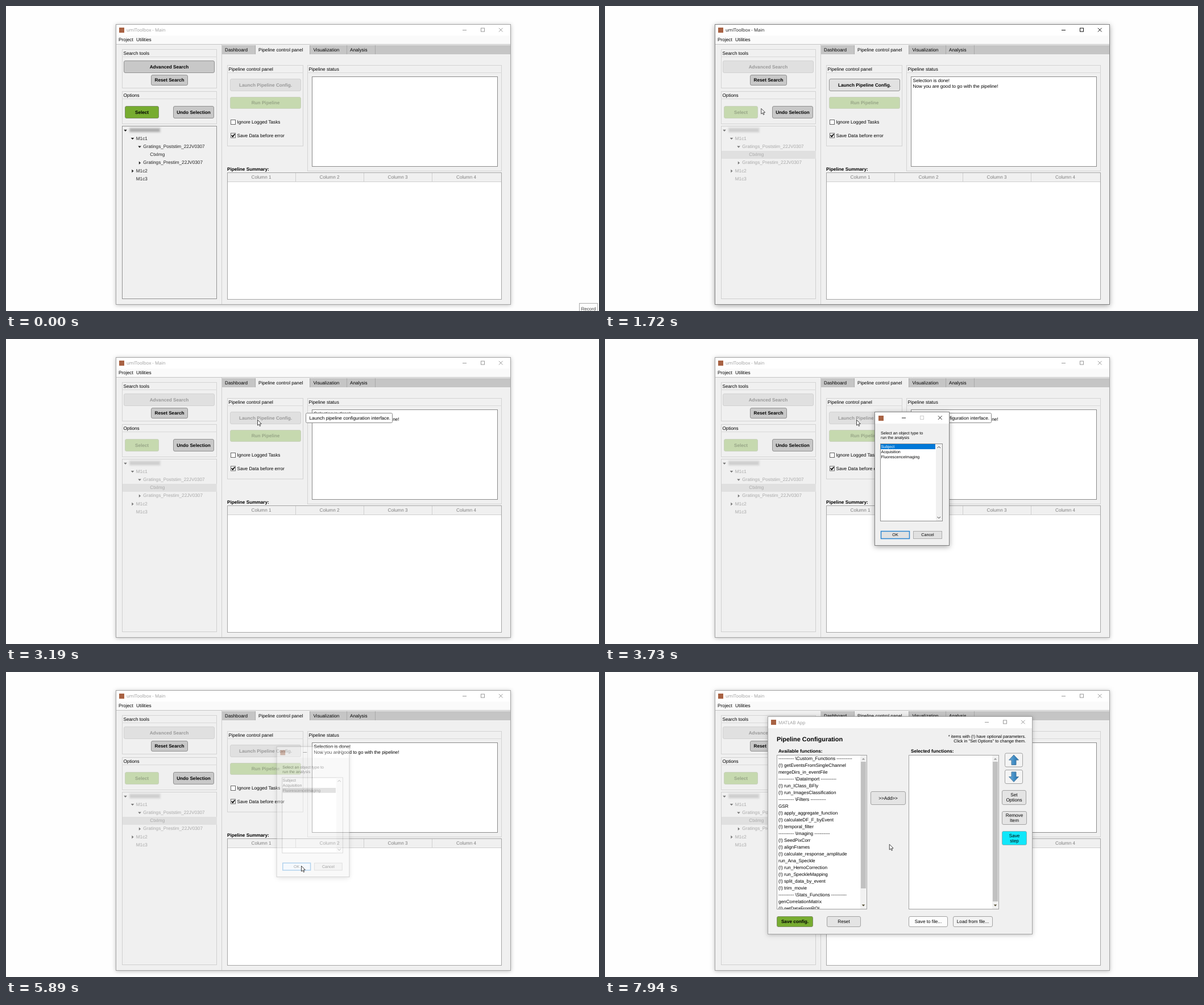
Write an HTML page with a canvas that moves like this. It is 1043 px wide and 537 px high and loops after 8000 ms.

```html
<!DOCTYPE html>
<html lang="en">
<head>
<meta charset="utf-8">
<title>umIToolbox pipeline</title>
<style>
html, body { margin: 0; width: 100%; height: 100%; overflow: hidden; background: #fefefe; }
canvas { display: block; }
</style>
</head>
<body>
<canvas id="stage" width="1043" height="537"></canvas>
<script>
const W = 1043, H = 537, LOOP = 8000, STEP = LOOP / 116;
const ARIAL = '"Liberation Sans", Arial, sans-serif';
const UI = '"Open Sans", "Noto Sans", sans-serif';
const GREEN = '#77ac30', PALE_GREEN = '#c6d9af', GREEN_EDGE = '#7f8f68', FACE = '#f0f0f0';

const screenCtx = document.getElementById('stage').getContext('2d');
const layer = document.createElement('canvas');
layer.width = W;
layer.height = H;
const layerCtx = layer.getContext('2d');
let c = screenCtx;

// Moments (ms) at which the interface changes
const T = {
  record: 70, focus: 760, select: 1480, press: 2760, launch: 3190, dialog: 3330,
  tipEnd: 4010, pick: 4500, ok: 5690, close: 5760, gone: 6000,
  config: 6850, body: 7330, content: 7660
};

// Pointer path: time, x, y
const PATH = [
  [70, 1010, 531], [340, 430, 300], [480, 264, 218], [620, 262, 258],
  [850, 262, 258], [1030, 244.5, 220], [1240, 240, 187], [1620, 240, 187],
  [2200, 431, 148], [2340, 433, 148.5], [2830, 442, 142], [3730, 442, 142],
  [3940, 494, 334], [4430, 508, 205], [4780, 510, 213], [5110, 493, 384],
  [5340, 522, 386], [5620, 519, 341], [6230, 519, 341], [6510, 510, 337],
  [7590, 510, 337], [7940, 499.5, 302]
];

function pointer(t) {
  let i = PATH.findIndex(p => p[0] > t);
  if (i < 0) i = PATH.length - 1;
  if (i === 0) return PATH[0].slice(1);
  const [t0, x0, y0] = PATH[i - 1], [t1, x1, y1] = PATH[i];
  const p = Math.min(1, (t - t0) / (t1 - t0));
  return [x0 + (x1 - x0) * p, y0 + (y1 - y0) * p];
}

function fill(x, y, w, h, color) {
  c.fillStyle = color;
  c.fillRect(x, y, w, h);
}

function box(x, y, x2, y2, border, color, lw = 1) {
  if (color) fill(x, y, x2 - x, y2 - y, color);
  c.strokeStyle = border;
  c.lineWidth = lw;
  c.strokeRect(x + 0.5, y + 0.5, x2 - x - 1, y2 - y - 1);
}

function line(color, ...pts) {
  c.strokeStyle = color;
  c.lineWidth = 1;
  c.beginPath();
  for (let i = 0; i < pts.length; i += 2) c.lineTo(pts[i], pts[i + 1]);
  c.stroke();
}

function poly(color, ...pts) {
  c.fillStyle = color;
  c.beginPath();
  for (let i = 0; i < pts.length; i += 2) c.lineTo(pts[i], pts[i + 1]);
  c.closePath();
  c.fill();
}

// y is the vertical middle of the line
function text(s, x, y, { size = 8.2, bold = false, color = '#000', align = 'left', font = ARIAL } = {}) {
  c.font = `${bold ? 'bold ' : ''}${size}px ${font}`;
  c.textRendering = 'geometricPrecision';
  c.textAlign = align;
  c.fillStyle = color;
  c.fillText(s, x, y + size * 0.33);
}

function button(label, x, y, x2, y2, { face = '#e4e4e4', border = '#a2a2a2', color = '#000', bold = false } = {}) {
  c.beginPath();
  c.roundRect(x + 0.5, y + 0.5, x2 - x - 1, y2 - y - 1, 2.5);
  c.fillStyle = face;
  c.fill();
  c.strokeStyle = border;
  c.lineWidth = 1;
  c.stroke();
  const rows = label.split('\n');
  rows.forEach((s, i) => text(s, (x + x2) / 2, (y + y2) / 2 + (i - (rows.length - 1) / 2) * 9,
    { bold, color, align: 'center' }));
}

function mainButton(label, x, y, x2, y2, on, face = '#c8c8c8', off = '#e0e0e0') {
  const green = face === GREEN;
  button(label, x, y, x2, y2, {
    bold: true, face: on ? face : off,
    border: on ? (green ? GREEN_EDGE : '#929292') : (green ? '#c9d2bd' : '#d2d2d2'),
    color: on ? '#000' : (green ? '#97a587' : '#999')
  });
}

function group(title, x, y, x2, y2) {
  box(x, y, x2, y2, '#d3d3d3');
  line('#d9d9d9', x, y + 13.5, x2, y + 13.5);
  text(title, x + 2.5, y + 6.9);
}

function frame(x, y, x2, y2, barH, strong) {
  c.save();
  c.shadowColor = strong ? 'rgba(0,0,0,.35)' : 'rgba(0,0,0,.26)';
  c.shadowBlur = strong ? 9 : 7;
  c.shadowOffsetY = strong ? 2 : 1;
  fill(x, y, x2 - x, y2 - y, FACE);
  c.restore();
  fill(x, y, x2 - x, barH, '#fff');
  box(x, y, x2, y2, strong ? '#808080' : '#a4a4a4');
}

function windowButtons(right, y, color, maxColor = color) {
  line(color, right - 84, y + 0.5, right - 77, y + 0.5);
  c.strokeStyle = maxColor;
  c.strokeRect(right - 51.5, y - 3, 6, 6);
  line(color, right - 20, y - 3.2, right - 13.4, y + 3.4);
  line(color, right - 13.4, y - 3.2, right - 20, y + 3.4);
}

const icon = (x, y) => fill(x, y, 9, 9, '#a86243');

function treeArrow(x, y, open, color) {
  if (open) poly(color, x - 2.8, y - 1.2, x + 2.8, y - 1.2, x, y + 2);
  else poly(color, x - 1.2, y - 2.8, x - 1.2, y + 2.8, x + 2, y);
}

const TREE = [
  ['', 210, 'open'], ['M1c1', 222.5, 'open'], ['Gratings_Poststim_22JV0307', 235, 'open'],
  ['CtxImg', 247, ''], ['Gratings_Prestim_22JV0307', 235, 'shut'], ['M1c2', 222.5, 'shut'], ['M1c3', 222.5, '']
];
const rowY = i => 218.5 + i * 14.32;

function tree(t, on) {
  box(204, 211, 371, 516, on ? '#929292' : '#d0d0d0', FACE);
  const [px, py] = pointer(t - 100);
  const hover = Math.floor((py - 211) / 14.32);
  if (on && t > T.record && px > 204 && px < 371 && hover >= 0 && hover < TREE.length)
    fill(205, rowY(hover) - 7, 165, 14.3, '#dadada');
  if (t >= T.focus) {
    if (on) box(204, 255, 371, 269, '#56a0d3', '#b4daf3');
    else fill(205, 255, 166, 14, '#e0e0e0');
  }
  TREE.forEach(([name, x, state], i) => {
    const y = rowY(i);
    if (state) treeArrow(x, y + 0.5, state === 'open', on ? '#222' : '#777');
    text(name, x + 6.3, y, { color: on ? '#222' : '#a8a8a8' });
  });
  c.save();
  c.filter = 'blur(1.5px)';
  fill(217, 214, 55, 9, on ? '#d4d4d4' : '#dedede');
  fill(218, 216, 52, 5, on ? '#aaa' : '#cdcdcd');
  c.restore();
}

function checkBox(label, y, checked) {
  box(395, y - 4.5, 404, y + 4.5, '#666', '#fff');
  if (checked) {
    c.lineWidth = 1.7;
    c.strokeStyle = '#000';
    c.beginPath();
    c.moveTo(396.8, y - 0.5);
    c.lineTo(398.8, y + 2);
    c.lineTo(402.3, y - 2.6);
    c.stroke();
  }
  text(label, 406.5, y);
}

function mainWindow(t) {
  const active = t >= T.focus && t < T.launch;
  const free = t < T.select;
  const ready = !free && t < T.launch;
  frame(193, 32, 888, 526, 20, active);
  icon(199, 38);
  text('umIToolbox - Main', 212, 42.7, { size: 7.9, font: UI, color: active ? '#111' : '#999' });
  windowButtons(887, 42, active ? '#111' : '#999');
  fill(194, 52, 693, 15, '#fafafa');
  line('#c4c4c4', 194, 67.5, 887, 67.5);
  text('Project', 198, 59.5, { size: 8.3 });
  text('Utilities', 229, 59.5, { size: 8.3 });

  group('Search tools', 204, 76, 371, 145);
  mainButton('Advanced Search', 207, 96, 367, 118, free);
  mainButton('Reset Search', 255, 121, 320, 140, true);
  group('Options', 204, 150, 371, 208);
  mainButton('Select', 209, 176, 269, 198, free, GREEN, PALE_GREEN);
  mainButton('Undo Selection', 294, 176, 366, 198, true);
  tree(t, free);

  line('#cfcfcf', 379.5, 68, 379.5, 525);
  fill(380, 69, 507, 16, '#c5c5c5');
  fill(438, 69, 96, 16, FACE);
  for (const x of [438.5, 534.5, 599.5, 649.5]) line('#aaa', x, 69, x, 85);
  text('Dashboard', 385, 77);
  text('Pipeline control panel', 444, 77);
  text('Visualization', 540.5, 77);
  text('Analysis', 605, 77);

  group('Pipeline control panel', 389, 104, 523, 247);
  const pressed = t >= T.press && ready;
  mainButton('Launch Pipeline Config.', 394, 128, 519, 150, ready, pressed ? '#d0d0d0' : '#e2e2e2');
  mainButton('Run Pipeline', 394, 160, 519, 181, false, GREEN, PALE_GREEN);
  checkBox('Ignore Logged Tasks', 204.5, false);
  checkBox('Save Data before error', 228, true);

  group('Pipeline status', 530, 104, 872, 291);
  box(538, 124, 865, 283, '#8a8a8a', '#fff');
  if (!free) {
    text('Selection is done!', 541.5, 131.5);
    text('Now you are good to go with the pipeline!', 541.5, 141);
  }

  text('Pipeline Summary:', 389, 287, { bold: true });
  box(389, 293, 872, 517, '#a5a5a5', '#fff');
  fill(390, 294, 481, 16, FACE);
  line('#cfcfcf', 390, 309.5, 871, 309.5);
  [449, 569, 689, 809.5].forEach((x, i) => {
    text('Column ' + (i + 1), x, 301.7, { color: '#7d7d7d', align: 'center' });
    if (i) line('#cfcfcf', 389.5 + i * 120, 294, 389.5 + i * 120, 310);
  });
}

function tooltip() {
  c.beginPath();
  c.roundRect(527.5, 130.5, 152, 17, 2);
  c.fillStyle = '#fff';
  c.fill();
  c.lineWidth = 1;
  c.strokeStyle = '#888';
  c.stroke();
  text('Launch pipeline configuration interface.', 676, 139, { align: 'right' });
}

function dialog(t) {
  frame(474, 128, 606, 364, 21, true);
  icon(481, 135);
  windowButtons(606, 138.5, '#222', '#ccc');
  const small = { size: 7.15 };
  text('Select an object type to', 485, 165.5, small);
  text('run the analysis', 485, 174, small);
  box(484, 184, 594, 321, '#8f8f8f', '#fff');
  fill(582, 185, 11, 135, FACE);
  line('#444', 584.5, 192, 587.2, 189.3, 590, 192);
  line('#444', 584.5, 313, 587.2, 315.7, 590, 313);
  const chosen = t < T.pick ? 0 : 2;
  const focused = t < T.ok;
  ['Subject', 'Acquisition', 'FluorescenceImaging'].forEach((s, i) => {
    const y = 189.5 + i * 9;
    if (i === chosen) fill(485, y - 4.5, 96, 9, focused ? '#0078d7' : '#b0b0b0');
    text(s, 485.5, y, { size: 7.1, color: i === chosen && focused ? '#fff' : '#000' });
  });
  const [px, py] = pointer(t);
  const over = (x, x2) => px > x && px < x2 && py > 337 && py < 352;
  const okHot = over(485, 536);
  box(485, 338, 536, 352, '#2a85d0', okHot ? '#e5f1fb' : '#e1e1e1', 1.5);
  box(542, 338, 593, 352, '#adadad', over(542, 593) ? '#e5f1fb' : '#e1e1e1');
  text('OK', 510.5, 344.7, { size: 7.2, align: 'center' });
  text('Cancel', 567.5, 344.7, { size: 7.2, align: 'center' });
}

const FUNCTIONS = [
  '\\Custom_Functions', '!getEventsFromSingleChannel', 'mergeDirs_in_eventFile',
  '\\DataImport', '!run_IClass_BFly', '!run_ImagesClassification',
  '\\Filters', 'GSR', '!apply_aggregate_function', '!calculateDF_F_byEvent', '!temporal_filter',
  '\\Imaging', '!SeedPixCorr', '!alignFrames', '!calculate_response_amplitude', 'run_Ana_Speckle',
  '!run_HemoCorrection', '!run_SpeckleMapping', '!split_data_by_event', '!trim_movie',
  '\\Stats_Functions', 'genCorrelationMatrix', '!getDataFromROI'
];

function listLabel(s) {
  if (s[0] === '\\') return `---------- ${s} ----------`;
  return s[0] === '!' ? '(!) ' + s.slice(1) : s;
}

function listBox(x, x2, thumbEnd) {
  box(x, 146, x2, 418, '#a2a2a2', '#fff');
  fill(x2 - 12, 147, 11, 270, '#f1f1f1');
  fill(x2 - 11, 158, 9, thumbEnd - 158, '#c1c1c1');
  const m = x2 - 6.5;
  poly('#999', m - 2.8, 154.5, m + 2.8, 154.5, m, 151.5);
  poly('#504a30', m - 2.8, 409.5, m + 2.8, 409.5, m, 412.5);
}

// dir is -1 for up, 1 for down
function blueArrow(y, dir) {
  button('', 703, y - 12.5, 735, y + 12.5, { face: '#f4f4f4' });
  const g = c.createLinearGradient(710, 0, 728, 0);
  g.addColorStop(0, '#6cb0de');
  g.addColorStop(1, '#1d6cab');
  const pts = [719, 9, 727.5, 0, 723, 0, 723, -8.5, 715, -8.5, 715, 0, 710.5, 0];
  const placed = pts.map((v, i) => i % 2 ? y + v * dir : v);
  poly(g, ...placed);
  line('#4f7c9f', ...placed, placed[0], placed[1]);
}

function configContent() {
  text('Pipeline Configuration', 302, 118.3, { size: 10.9, bold: true });
  const note = { size: 7.5, align: 'right' };
  text('* items with (!) have optional parameters.', 740, 113.8, note);
  text('Click in "Set Options" to change them.', 740, 122, note);
  text('Available functions:', 305, 139.4, { bold: true });
  text('Selected functions:', 538, 139.4, { bold: true });
  listBox(302, 461, 381);
  listBox(534, 693, 404);
  c.save();
  c.beginPath();
  c.rect(303, 147, 146, 270);
  c.clip();
  FUNCTIONS.forEach((s, i) => text(listLabel(s), 305, 152.5 + i * 12));
  c.restore();
  button('>>Add>>', 467, 210, 529, 234);
  blueArrow(155, -1);
  blueArrow(184.5, 1);
  button('Set\nOptions', 698, 208, 741, 234);
  button('Remove\nItem', 698, 245, 742, 269);
  button('Save\nstep', 698, 280, 742, 305, { face: '#11e7fa', border: '#7fb4ba' });
  button('Save config.', 302, 430, 366, 449, { face: GREEN, border: GREEN_EDGE, bold: true });
  button('Reset', 390, 430, 450, 449);
  button('Save to file...', 534, 430, 603, 449, { face: '#fdfdfd' });
  button('Load from file...', 612, 430, 682, 449, { face: '#f3f3f3' });
}

function configWindow(t) {
  frame(286, 78, 752, 462, t < T.body ? 384 : 21, false);
  icon(292, 84);
  windowButtons(752, 88, t < T.body ? '#777' : '#999');
  if (t >= T.body) text('MATLAB App', 305, 88.9, { size: 8, font: UI, color: '#999' });
  if (t >= T.content) configContent();
}

// Paints a window as one layer, scaled around its middle
function fade(alpha, scale, cx, cy, draw) {
  if (alpha <= 0) return;
  if (alpha >= 1) return draw();
  layerCtx.clearRect(0, 0, W, H);
  c = layerCtx;
  c.save();
  c.translate(cx, cy);
  c.scale(scale, scale);
  c.translate(-cx, -cy);
  draw();
  c.restore();
  c = screenCtx;
  c.globalAlpha = alpha;
  c.drawImage(layer, 0, 0);
  c.globalAlpha = 1;
}

const unit = (t, a, b) => Math.max(0, Math.min(1, (t - a) / (b - a)));

function arrowCursor([x, y]) {
  const pts = [0, 0, 0, 9.6, 2.2, 7.6, 3.8, 11, 5.3, 10.3, 3.8, 7, 6.8, 6.8, 0, 0]
    .map((v, i) => v + (i % 2 ? y : x) + 0.5);
  poly('#fff', ...pts);
  line('#444', ...pts);
}

function render(t) {
  const q = Math.floor((t + 5) / STEP) * STEP;
  fill(0, 0, W, H, '#fefefe');
  mainWindow(t);
  if (t < T.record) {
    box(1008, 523, 1041, 540, '#aaa', '#fdfdfd');
    text('Record', 1024.5, 533, { size: 8.1, color: '#444', align: 'center' });
  }
  if (t >= T.launch && t < T.tipEnd) tooltip();
  if (t >= T.dialog && t < T.gone) {
    const inn = 1 - (1 - unit(q, T.dialog - 40, T.dialog + 220)) ** 2;
    const out = unit(q, T.close - 20, T.gone);
    fade(inn * (1 - out) ** 1.6, 0.92 + 0.08 * inn - 0.05 * out, 540, 246, () => dialog(t));
  }
  if (t >= T.config) {
    const inn = 1 - (1 - unit(q, T.config - 50, T.config + 300)) ** 3;
    fade(inn, 0.9 + 0.1 * inn, 519, 270, () => configWindow(t));
  }
  if (t >= T.record) arrowCursor(pointer(q));
}

const start = performance.now();
function tick() {
  render((performance.now() - start) % LOOP);
  requestAnimationFrame(tick);
}
tick();
</script>
</body>
</html>
```
